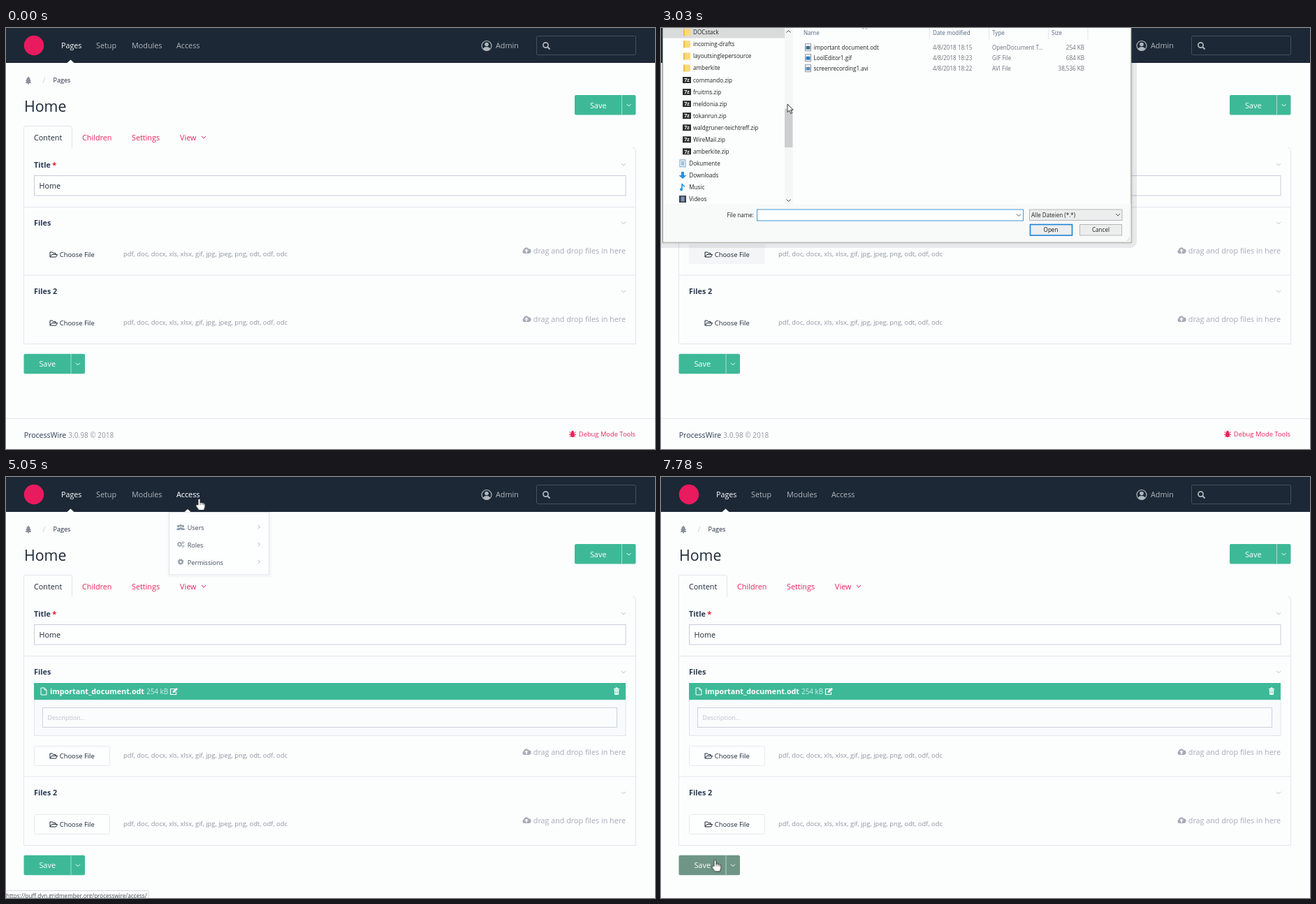
Write an HTML page that moves like this. It is 929 px wide and 603 px high and loops after 8000 ms.

```html
<!DOCTYPE html>
<html lang="en">
<head>
<meta charset="utf-8">
<title>File upload</title>
<style>
  html, body { margin: 0; width: 100%; height: 100%; overflow: hidden; background: #fcfefe; }
  svg { display: block; width: 929px; height: 603px; font-family: "Open Sans", "Noto Sans", sans-serif; }
  text { white-space: pre; }
  #dialog { transform-origin: 338px 92px; }
</style>
</head>
<body>
<svg id="stage" viewBox="0 0 929 603"></svg>
<script>
const LOOP = 8000;
const NAVY = '#1c2836', INK = '#2b3a52', PINK = '#e8245f', GREEN = '#3eb998', GRAY = '#a6abb6', LINE = '#e2e6ec';

// Drawing helpers, each returning SVG markup
const text = (x, y, str, size = 10.8, fill = NAVY, attrs = '') =>
  `<text x="${x}" y="${y}" font-size="${size}" fill="${fill}" ${attrs}>${str}</text>`;
const BOLD = 'font-weight="700"', END = 'text-anchor="end"', MID = 'text-anchor="middle"';
const rect = (x, y, w, h, fill = 'none', attrs = '') =>
  `<rect x="${x}" y="${y}" width="${w}" height="${h}" fill="${fill}" ${attrs}/>`;
const path = (d, fill = 'none', stroke = 'none', attrs = '') =>
  `<path d="${d}" fill="${fill}" stroke="${stroke}" ${attrs}/>`;
const circle = (x, y, r, fill, attrs = '') => `<circle cx="${x}" cy="${y}" r="${r}" fill="${fill}" ${attrs}/>`;
const group = (id, body) => `<g id="${id}">${body}</g>`;
const at = (x, y, body) => `<g transform="translate(${x} ${y})">${body}</g>`;
const stroke = (color, width = 1) => `stroke="${color}" stroke-width="${width}"`;
const chevron = (x, y, color, turn = 0, w = 3) =>
  `<g transform="translate(${x} ${y}) rotate(${turn})">${path(`M${-w} ${-w / 2}L0 ${w / 2}L${w} ${-w / 2}`, 'none', color)}</g>`;

const icons = {
  folder: path('M-5 3.5V-3.5H-1.5L-.5 -2H3V0M-5 3.5L-2.5 0H5.5L3.5 3.5Z', 'none', NAVY),
  cloud: path('M-3.5 4.5A3 3 0 0 1 -4 -1A3.8 3.8 0 0 1 3 -2.3A3.4 3.4 0 0 1 3.5 4.5Z', GRAY) +
    path('M0 -2.2L2.8 .8H1V3.2H-1V.8H-2.8Z', '#fcfefe'),
  tree: path('M0 -5.5L3 -2H2L4 1H2.5L4.5 4H1V5.5H-1V4H-4.5L-2.5 1H-4L-2 -2H-3Z', '#8a919c'),
  bug: path('M-4.5 -3L-2 -1M4.5 -3L2 -1M-5 1H5M-4 4.5L-2 2.5M4 4.5L2 2.5', 'none', PINK) +
    `<ellipse cy="1" rx="2.9" ry="3.8" fill="${PINK}"/>` + circle(0, -3, 1.8, PINK),
  users: [[-3.3, -1], [3.3, -1], [0, -2]].map(([x, y]) =>
    circle(x, y, 1.8, '#8f9cac') + path(`M${x - 2.5} ${y + 5.5}v-1.5q2.5 -3 5 0v1.5Z`, '#8f9cac')).join(''),
  gear: circle(0, 0, 2.5, 'none', stroke('#8f9cac', 1.8)) +
    circle(0, 0, 3.7, 'none', stroke('#8f9cac', 1.4) + ' stroke-dasharray="1.4 1.5"'),
  gears: circle(-1.5, 0, 2.4, 'none', stroke('#8f9cac', 1.5)) +
    circle(3.5, -2.5, 1.3, 'none', stroke('#8f9cac')) + circle(3.5, 2.8, 1.3, 'none', stroke('#8f9cac')),
  file: path('M-4 -5H1L4 -2V5H-4ZM1 -5V-2H4', 'none', '#fff'),
  edit: path('M2 -3.5H-4.5V4.5H3.5V1', 'none', '#fff', 'stroke-width="1.2"') + path('M-1.5 2L-1 -.5L4 -5L6 -3L1 1.7Z', '#fff'),
  trash: path('M-4 -4H-1.5V-5.5H1.5V-4H4V-2.8H-4ZM-3.3 -2.2H3.3L2.8 5H-2.8Z', '#fff') +
    path('M-1.2 -1V3.5M1.2 -1V3.5', 'none', GREEN, 'stroke-width=".8"'),
  arrow: path('M0 0V11.5L2.7 9L4.7 13.5L6.6 12.7L4.6 8.3H8.2Z', '#fff', '#222', 'stroke-width=".9"'),
  hand: path('M-1.5 9V1Q0 -1 1.5 1V6Q3 4.8 4.3 6.2Q5.6 5.4 6.4 6.8Q8 6.3 8.3 8V12L6.8 16.5H-.5L-4.6 10.5Q-4.8 8 -2.8 8.8Z',
    '#fff', '#222', 'stroke-width=".9"') + path('M1.5 6V9M4.2 6.2V9M6.4 7V9.5', 'none', '#444', 'stroke-width=".7"')
};

const saveButton = (x, y, id) => at(x, y,
  `<rect id="${id}" width="87.5" height="28.5" rx="2" fill="${GREEN}"/>` +
  path('M67.5 0V28.5', 'none', '#a5dccc') + text(33.7, 18.7, 'Save', 10.9, '#fff', MID) + chevron(77.5, 14.5, '#fff'));

// One upload field; y is the top edge of its row
const uploadField = (n, y, label) => at(0, y,
  group(`border${n}`, rect(40.5, 54.5, 108, 28, '#fdfefe', stroke('#e6e9ed') + ' rx="2"')) +
  group(`hover${n}`, rect(40, 54, 108.5, 28, '#f4f5f6', 'rx="2"')) +
  label +
  at(68, 68.5, icons.folder) + text(76.8, 72, 'Choose File', 9.37) +
  text(168, 71, 'pdf, doc, docx, xls, xlsx, gif, jpg, jpeg, png, odt, odf, odc', 9.33, '#8f969f') +
  at(745, 62.5, icons.cloud) + text(887, 66.5, 'drag and drop files in here', 10.78, GRAY, END));

const label = (id, y, str) =>
  `<g id="${id}">${text(40, y, str, 10.8, INK, BOLD)}</g>` + chevron(884, y - 4, '#b9bfc7');

const header =
  rect(0, 0, 929, 50, NAVY) + circle(40, 25, 14.2, '#ea1a5f') +
  text(79, 29, 'Pages', 10.7, '#fff') + text(129, 29, 'Setup', 10.8, '#b0b6be') +
  text(180, 29, 'Modules', 10.8, '#b0b6be') + text(244, 29, 'Access', 10.8, '#b0b6be') +
  path('M87.5 50L92.5 45.5L97.5 50Z', '#fcfefe') +
  circle(688, 25.5, 7, 'none', stroke('#b0b6be', 1.2)) + circle(688, 23.5, 2.8, '#b0b6be') +
  path('M682.7 30Q684 27 688 27T693.3 30Q688 35 682.7 30Z', '#b0b6be') +
  text(701, 29, 'Admin', 10.8, '#b0b6be') +
  rect(759.5, 11.5, 142, 27, 'none', stroke('#435062') + ' rx="2"') +
  circle(772.5, 24.5, 3.6, 'none', stroke('#b0b6be', 1.7)) + path('M775 27L778.5 30.5', 'none', '#b0b6be', 'stroke-width="2"');

const top_ =
  at(32, 75, icons.tree) + text(52.5, 78.5, '/', 10, '#c5cad1') + text(67.5, 78, 'Pages', 9.1) +
  text(26, 120, 'Home', 21.3) + saveButton(814, 96, 'saveTop') +
  path('M25.5 354V143Q25.5 140.5 28 140.5H92Q94.5 140.5 94.5 143V172M897 171.5Q901.5 171.5 901.5 176V354', 'none', LINE) +
  text(40, 160.5, 'Content') + text(109, 160.5, 'Children', 10.8, PINK) +
  text(180, 160.5, 'Settings', 10.8, PINK) + text(249, 160.5, 'View', 10.8, PINK) + chevron(283, 156.5, PINK) +
  label('labelTitle', 199.5, 'Title') + text(66.3, 200, '*', 11, '#e0202c', BOLD) +
  rect(40.5, 211.5, 846.5, 28.5, '#fdfefe', stroke('#c9cdd9')) + text(47.5, 230.3, 'Home') +
  path('M25 256.5H902', 'none', LINE) + label('label1', 283.3, 'Files');

const fileItem =
  rect(40.5, 319, 846.5, 51.5, '#f8fafc', stroke('#e0e5ec')) + rect(40, 295, 847, 24, GREEN) +
  at(54, 307, icons.file) +
  group('fileName', text(63, 311, 'important_document.odt', 10.72, '#fff', BOLD) +
    text(201, 311, '254 kB', 9.87, '#d3efe6') + at(240, 307, icons.edit) + at(874, 307, icons.trash)) +
  rect(52.5, 330.5, 822, 28, '#fbfcfd', stroke('#ccd2df')) + text(59.5, 348, 'Description...', 8.8, '#bcc1ca');

const lower =
  rect(0, 296, 929, 420, '#fcfefe') +
  path('M25.5 270V452.5H901.5V270M25 354H902', 'none', LINE) +
  uploadField(1, 256, '') +
  uploadField(2, 354, label('label2', 27.3, 'Files 2')) +
  saveButton(25.5, 466.7, 'saveBottom') +
  path('M0 559.5H929', 'none', LINE) +
  text(25.7, 586.5, 'ProcessWire', 10.6, INK) + text(89.3, 586.5, '3.0.98 © 2018', 10.05, '#8f969f') +
  at(811, 581.5, icons.bug) + text(901, 585.3, 'Debug Mode Tools', 9.36, PINK, END);

const menu =
  text(244, 29, 'Access', 10.8, '#dfe3e8') + path('M255 50.5L260 46L265 50.5Z', '#fdfefe') +
  rect(231, 50, 149, 94, '#8090a0', 'opacity=".05"') +
  rect(233.5, 50.5, 143, 89.5, '#fdfefe', stroke('#dfe4ea')) +
  group('menuHover', rect(234, 58, 142, 25, '#e1e7ee')) +
  [['Users', 'users'], ['Roles', 'gears'], ['Permissions', 'gear']].map(([name, icon], i) =>
    at(0, 71.5 + i * 25, at(250, 0, icons[icon]) + text(259.7, 4, name, 9.05, '#3f4c5c') + chevron(362, 0, '#aab2bc', -90, 2.6))).join('');

const URL_BASE = 'https://puff.dyn.gridmember.org/processwire/access/';
const status = (width, url) => rect(-1, 592.5, width, 12, '#fdfefe', stroke('#d5d8db')) + text(0, 602.8, url, 8.1, '#444b52');

const folderIcon = rect(-5, -5, 10, 10, '#f9d978', 'rx="1"') + path('M-5 -5V5H-3V-5Z', '#e9bd4c');
const zipIcon = rect(-6, -4.5, 12, 9, '#2e2e2e') + text(0, 2.7, '7z', 7, '#fff', `${MID} ${BOLD}`);
const placeIcons = [
  rect(-4, -5, 8, 10, '#e9f2fa', stroke('#7fa6c9')) + path('M-2 -2H2M-2 0H2M-2 2H2', 'none', '#5b8fc0'),
  path('M-2 -5H2V0H5.5L0 5L-5.5 0H-2Z', '#2f8fdc'),
  path('M-1 3V-5Q0 -2 3 -1', 'none', '#2196e8', 'stroke-width="1.6"') + circle(-2, 3.2, 2, '#2196e8'),
  rect(-5, -5, 10, 10, '#39414d') + rect(-2.5, -3.5, 5, 7, '#7d93b5')
];
const folders = ['DOCstack', 'incoming-drafts', 'layoutsinglepersource', 'amberkite'];
const archives = ['commando', 'fruitms', 'meldonia', 'tokanrun', 'waldgruner-teichtreff', 'WireMail', 'amberkite'];
const places = ['Dokumente', 'Downloads', 'Music', 'Videos'];
const files = [
  ['important document.odt', '18:15', 'OpenDocument T...', '254 KB'],
  ['LoolEditor1.gif', '18:23', 'GIF File', '684 KB'],
  ['screenrecording1.avi', '18:22', 'AVI File', '38,536 KB']
];
const small = (x, y, str, fill = '#222', attrs = '') => text(x, y, str, 8.1, fill, attrs);
const treeRow = (i, icon, iconX, textX, str) => at(0, 6.3 + 17.05 * i, at(iconX, 0, icon) + small(textX, 3, str));

const dialog =
  rect(-30, -60, 711, 375, '#30304a', 'rx="9" opacity=".1"') +
  rect(-30, -60, 706, 370, '#30304a', 'rx="5" opacity=".06"') +
  rect(2.5, -60, 670.5, 367, '#fcfdfd', stroke('#87917a')) + rect(3, 252, 669.5, 54.5, '#f8f9f9') +
  rect(3, -60, 174, 74.5, '#dadbdb') +
  folders.map((s, i) => treeRow(i, folderIcon, 37, 46, s)).join('') +
  archives.map((s, i) => treeRow(i + 4, zipIcon, 37, 46, s + '.zip')).join('') +
  places.map((s, i) => treeRow(i + 11, placeIcons[i], 31, 40.3, s)).join('') +
  rect(177, -60, 11.5, 312, '#f5f6f6') + rect(177, 115.5, 11.5, 55.5, '#cdcecf') +
  chevron(182.5, 5, '#444', 180) + chevron(182.5, 247, '#444') +
  path('M384.5 0V16M469.5 0V16M554.5 0V16M611 0V16', 'none', '#e3e6e8') + chevron(291.5, 0, '#777', 180) +
  [[204, 'Name'], [389, 'Date modified'], [474, 'Type'], [559, 'Size']].map(([x, s]) => small(x, 10, s, '#55657f')).join('') +
  group('row1', rect(203, 20, 406, 15, '#e4f1fb')) + group('row2', rect(203, 35, 406, 15, '#e4f1fb')) +
  files.map(([name, time, type, size], i) => at(0, 27.7 + 15 * i,
    rect(206.5, -5, 8, 10, '#fff', stroke('#8a949e')) + rect(207.5, -2, 6, 5, ['#3d6f8f', '#2d78c4', '#5a8cb8'][i]) +
    small(218.5, 3, name) + small(389, 3, '4/8/2018 ' + time, '#6d7078') +
    small(474, 3, type, '#6d7078') + small(606, 3, size, '#6d7078', END))).join('') +
  small(133, 270.5, 'File name:', '#222', END) +
  rect(137.5, 260, 381, 16, '#fff', stroke('#4497d6')) + chevron(512, 268, '#555') +
  group('caret', path('M140.5 262V274', 'none', '#111')) +
  rect(527.5, 260, 132.5, 15.5, '#eceded', stroke('#b5b7b9')) + small(530, 270.5, 'Alle Dateien (*.*)') + chevron(654, 267.5, '#555') +
  rect(528.5, 281.5, 60, 15.5, '#eceeef', stroke('#1c82d6', 1.6)) + small(558, 292, 'Open', '#111', MID) +
  rect(599.5, 281.5, 60, 15.5, '#eceded', stroke('#b5b7b9')) + small(629.5, 292, 'Cancel', '#222', MID) +
  path('M670 300V304H666', 'none', '#b0b3b5', 'stroke-dasharray="1 1"');

document.getElementById('stage').innerHTML =
  header + top_ + group('progress', rect(40, 295.3, 847, 2.4, GREEN)) + group('item', fileItem) +
  group('lower', lower) + group('menu', menu) +
  group('statusAccess', status(205, URL_BASE)) + group('statusUsers', status(229.5, URL_BASE + 'users/')) +
  group('dialog', dialog) + group('pointer', group('arrow', icons.arrow) + group('hand', icons.hand));

// Holds each value until the next time in the table
function steps(id, prop, table) {
  const frames = table.map(([time, value]) => ({ offset: time / LOOP, [prop]: value, easing: 'step-end' }));
  frames.push({ offset: 1, [prop]: table[table.length - 1][1] });
  document.getElementById(id).animate(frames, { duration: LOOP, iterations: Infinity });
}
const show = (id, from, to = LOOP) =>
  steps(id, 'opacity', [[0, 0], [from, 1], ...(to < LOOP ? [[to, 0]] : [])]);

show('hover1', 1700, 4710);
show('hover2', 7430, 7780);
show('border1', 4710);
show('border2', 4710);
show('progress', 4400, 4710);
show('item', 4710);
show('menu', 4400, 6420);
show('menuHover', 6070, 6420);
show('statusUsers', 6070, 6760);
show('row2', 3380, 4050);
show('row1', 4050, 4400);
steps('statusAccess', 'opacity', [[0, 0], [4400, .5], [4710, 1], [6070, 0]]);
steps('fileName', 'opacity', [[0, .7], [5050, 1]]);
steps('label2', 'opacity', [[0, 1], [1010, .8], [1350, 1]]);
steps('label1', 'opacity', [[0, 1], [6760, .8], [7120, 1]]);
steps('saveBottom', 'fill', [[0, GREEN], [7780, '#6f9587']]);
steps('caret', 'opacity', [[0, 1], [2680, 0], [3380, 1], [4050, 0]]);
steps('lower', 'transform', [[0, 0], [4400, 2.3], [4710, 67], [5050, 75]].map(([t, y]) => [t, `translateY(${y}px)`]));
steps('dialog', 'opacity', [[0, 0], [2360, .82], [2680, 1], [4400, .04], [4710, 0]]);
steps('dialog', 'transform', [[0, 'scale(.988)'], [2680, 'scale(1)'], [4400, 'scale(.955)']]);

const pointer = [
  [0, '', 487, 484], [330, 'arrow', 487, 484], [680, 'arrow', 201, 474], [1010, 'arrow', 110, 361],
  [1350, 'arrow', 109.8, 351.3], [1700, 'hand', 91, 332], [2010, 'arrow', 91.3, 328], [3030, 'arrow', 181, 109],
  [3380, 'arrow', 278, 47], [3710, 'arrow', 278, 37], [4050, 'arrow', 276.3, 31.3], [4400, 'hand', 276.5, 31],
  [6070, 'hand', 245, 91], [6420, 'arrow', 254, 208], [6760, 'arrow', 250, 275], [7120, 'arrow', 159, 431],
  [7430, 'hand', 108, 507], [7780, 'hand', 77.5, 548.5]
];
steps('pointer', 'transform', pointer.map(([t, , x, y]) => [t, `translate(${x}px, ${y}px)`]));
for (const kind of ['arrow', 'hand']) steps(kind, 'opacity', pointer.map(([t, k]) => [t, +(k === kind)]));
</script>
</body>
</html>
```
